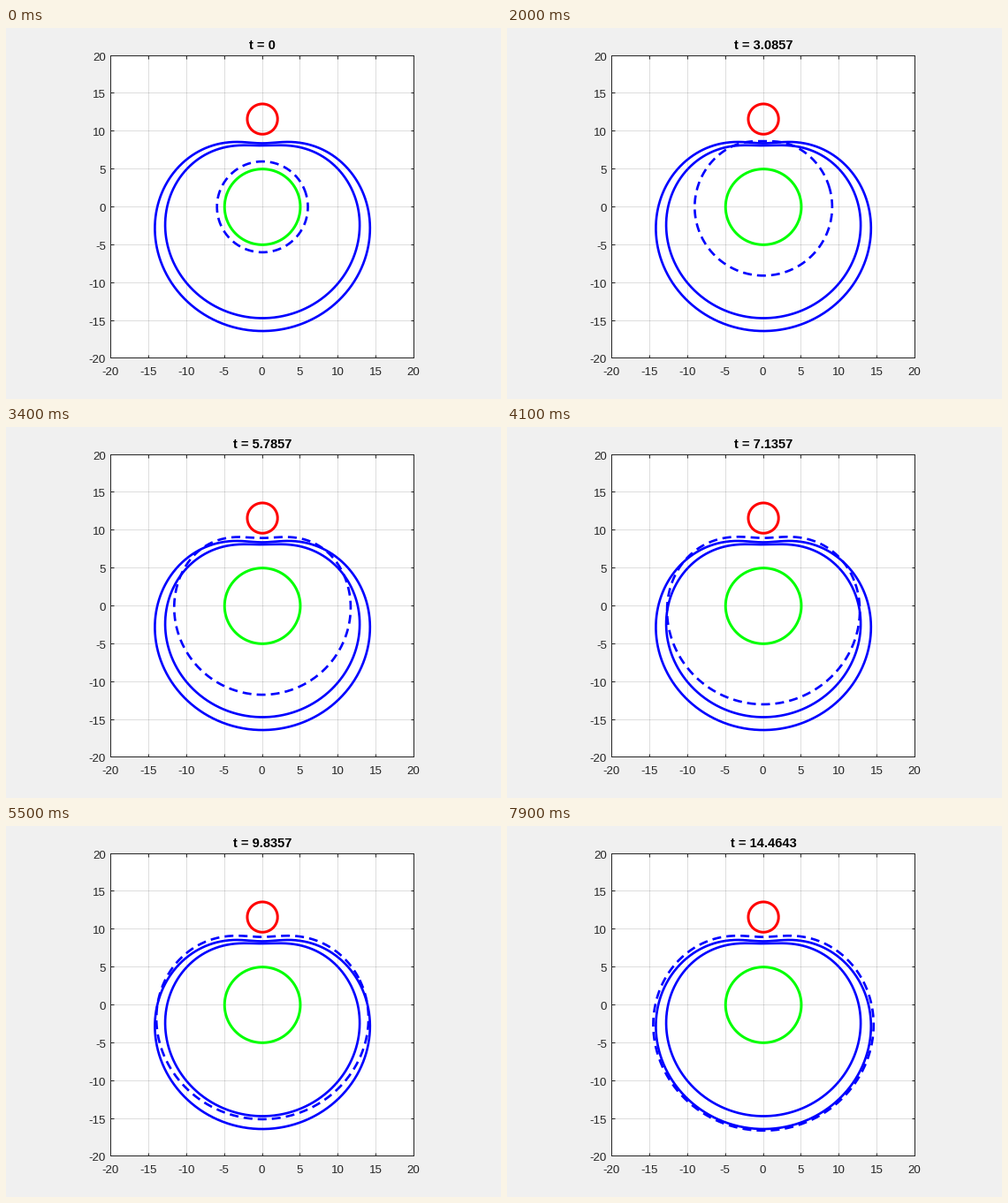
Recreate the animation shown at these times as a matplotlib script. Size 560 by 420 pixels, loop 8 s.

```python
import numpy as np
import matplotlib.pyplot as plt
from matplotlib.animation import FuncAnimation
from matplotlib.transforms import Affine2D

W, H, DPI = 560, 420, 100
PX = 72 / DPI                    # points per pixel
LEFT, BOTTOM, SIDE = 118.2, 46.6, 342.8
FRAMES, INTERVAL, HOLD = 80, 100, 4
DT = 2.7 / 14
R0 = 6.0
INK = "#262626"

plt.rcParams["font.family"] = "Liberation Sans"
theta = np.linspace(0, 2 * np.pi, 721)


def circle(radius, cy=0.0):
    return radius * np.cos(theta), cy + radius * np.sin(theta)


def dimpled(a, b, c, stretch):
    """Limacon with its dimple at the top."""
    rho = a - b * np.sin(theta)
    return stretch * rho * np.cos(theta), c + rho * np.sin(theta)


limit_x, limit_y = dimpled(12.96, 7.6, 3.61, 0.997)
limit_r = np.hypot(limit_x, limit_y)
scale = 0.7 + 0.24 * (limit_r - 8.97)


def front(t):
    """Unit-speed growth that eases off near the limit curve."""
    gap = scale * np.arcsinh(np.sinh((limit_r - R0) / scale) * np.exp(-t / scale))
    k = 1 - gap / limit_r
    return k * limit_x, k * limit_y


def clock(t):
    digits = 6 if t >= 10 else 5
    return f"t = {t:.{digits}g}"


fig = plt.figure(figsize=(W / DPI, H / DPI), dpi=DPI, facecolor="#f0f0f0")
ax = fig.add_axes([LEFT / W, BOTTOM / H, SIDE / W, SIDE / H])
ax.set(xlim=(-20, 20), ylim=(-20, 20))
ticks = range(-20, 21, 5)
ax.set_xticks(ticks)
ax.set_yticks(ticks)
ax.tick_params(direction="in", top=True, right=True, length=3.5 * PX,
               width=PX, color=INK, labelbottom=False, labelleft=False)
ax.grid(color=INK, alpha=0.15, linewidth=PX)
ax.set_axisbelow(True)
for spine in ax.spines.values():
    spine.set(color=INK, linewidth=PX)


def label(x, y, text, size, **style):
    return fig.text(x / W, 1 - y / H, text, fontsize=size * PX,
                    va="baseline", **style)


for v in ticks:
    step = (v + 20) / 40 * SIDE
    label(LEFT + step, 393, str(v), 13.33, ha="center", color=INK)
    label(113, H - BOTTOM - step + 6, str(v), 13.33, ha="right", color=INK)
title = label(290, 24, "t = 0", 14.67, ha="center", weight="bold")

# Grid lines snap to whole pixels; curves sit on the pixel centres.
centred = ax.transData + Affine2D().translate(0.5, -0.5)


def curve(points, color, width=2.67, **style):
    return ax.plot(*points, color=color, linewidth=width * PX,
                   solid_capstyle="butt", dash_capstyle="butt",
                   transform=centred, **style)[0]


curve(circle(2, 11.6), "#ff0000", 3)
curve(circle(5), "#00ff00", 3)
curve(dimpled(11.4, 6.2, 2.9, 1.009), "#0000ff")
curve(dimpled(12.4, 7.35, 3.35, 1.01), "#0000ff")
dash = curve(circle(R0), "#0000ff")
dash.set_linestyle((0, (10 / 2.67, 6 / 2.67)))


def update(i):
    t = max(0, i - HOLD) * DT
    dash.set_data(*front(t))
    title.set_text(clock(t))
    return dash, title


anim = FuncAnimation(fig, update, frames=FRAMES, interval=INTERVAL,
                     init_func=lambda: update(0), repeat=True, repeat_delay=0)
plt.show()
```
